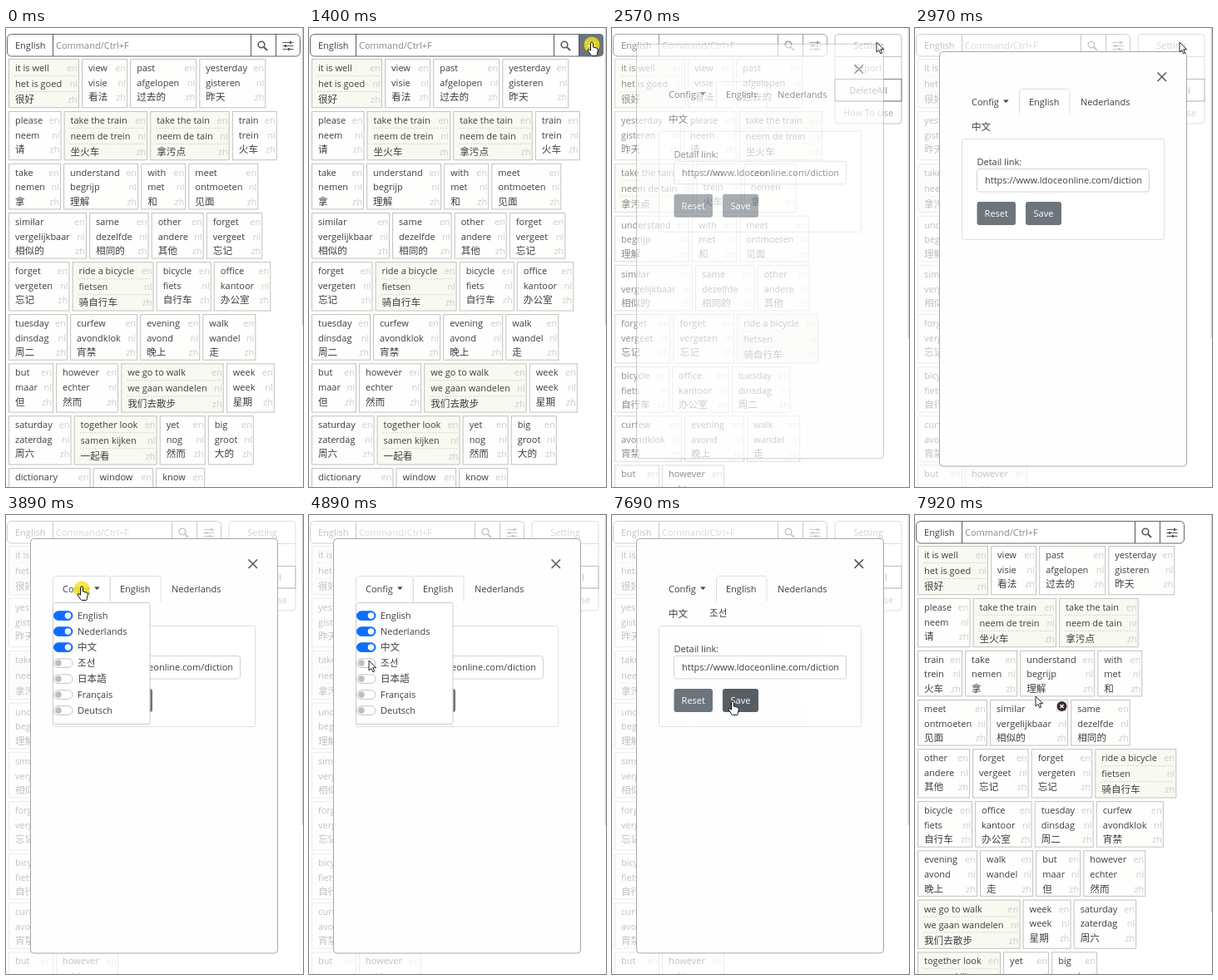
Write an HTML page that moves like this. It is 357x552 px and loops after 7990 ms.

```html
<!DOCTYPE html>
<html lang="en">
<head>
<meta charset="utf-8">
<title>Word cards</title>
<style>
html, body { margin: 0; width: 100%; height: 100%; overflow: hidden; background: #fff; }
svg { display: block; width: 357px; height: 552px; font: 11px "Open Sans", "Noto Sans CJK SC", "Noto Sans CJK KR", sans-serif; fill: #3c3f42; }
.cjk { font: 11.6px "Noto Sans CJK SC", "Noto Sans CJK", sans-serif; }
.ko { font: 11.6px "Noto Sans CJK KR", "Noto Sans CJK", sans-serif; }
.tag { fill: #cdcdcd; text-anchor: end; }
.mid { text-anchor: middle; }
.hint { fill: #85898d; }
.line { fill: none; stroke: #55595d; }
.dash { stroke: #d3d5cd; stroke-dasharray: 2 1.5; }
.soft { fill: #fff; stroke: #dcdfe2; }
</style>
</head>
<body>
<svg viewBox="0 0 357 552" xmlns="http://www.w3.org/2000/svg"></svg>
<script>
const LOOP = 7990;

// English | Dutch | Chinese | card width; "*" marks a phrase
const WORDS = `*it is well|het is goed|很好|85
view|visie|看法|55
past|afgelopen|过去的|80
yesterday|gisteren|昨天|80
please|neem|请|63.5
*take the train|neem de trein|坐火车|100.5
*take the tain|neem de tain|拿污点|95.5
train|trein|火车|54
take|nemen|拿|63
understand|begrijp|理解|90
with|met|和|54
meet|ontmoeten|见面|84
similar|vergelijkbaar|相似的|94
same|dezelfde|相同的|71.5
other|andere|其他|63
forget|vergeet|忘记|67.5
forget|vergeten|忘记|73.5
*ride a bicycle|fietsen|骑自行车|98
bicycle|fiets|自行车|66
office|kantoor|办公室|68.5
tuesday|dinsdag|周二|71
curfew|avondklok|宵禁|81
evening|avond|晚上|72
walk|wandel|走|64
but|maar|但|54
however|echter|然而|75
*we go to walk|we gaan wandelen|我们去散步|123.5
week|week|星期|58
saturday|zaterdag|周六|75.5
*together look|samen kijken|一起看|100
yet|nog|然而|55
big|groot|大的|55
dictionary|woordenboek|字典|98.5
window|raam|窗户|72.5
know|weten|知道|59`.split("\n").map(row => {
  const [en, nl, zh, w] = row.replace("*", "").split("|");
  return { text: [en, nl, zh], w: +w, phrase: row[0] === "*" };
});

const text = (x, y, s, cls = "", extra = "") => `<text x="${x}" y="${y}" class="${cls}" ${extra}>${s}</text>`;
const rect = (x, y, w, h, extra = "") => `<rect x="${x}" y="${y}" width="${w}" height="${h}" ${extra}/>`;
const path = (d, extra = 'class="line"') => `<path d="${d}" ${extra}/>`;

function layout(limit) {
  const rows = [];
  let row = null, x = 0;
  for (const word of WORDS) {
    if (!row || x + word.w > limit) {
      rows.push(row = { cards: [], phrase: false });
      x = 3;
    }
    row.cards.push({ ...word, x });
    row.phrase = row.phrase || word.phrase;
    x += word.w + 3.1;
  }
  return rows;
}

function card({ x, w, phrase, text: lines }, y, h) {
  const pitch = phrase ? 19 : 17.6;
  let out = rect(x + .5, y + .5, w - 1, h - 1, `fill="${phrase ? "#f8f9f0" : "#fefefc"}" stroke="#bfc2bd"`);
  lines.forEach((s, i) => {
    const base = y + 15 + i * pitch;
    out += text(x + 8, base, s, i === 2 ? "cjk" : "") + text(x + w - 2, base, ["en", "nl", "zh"][i], "tag");
    if (phrase && i < 2) out += path(`M${x + 7} ${base + 5.5}H${x + w - 3}`, 'class="dash"');
  });
  return out;
}

function cards(right) {
  let y = 37, out = "";
  for (const row of layout(right - 4)) {
    if (y > 552) break;
    const h = row.phrase ? 59.3 : 55.6;
    for (const c of row.cards) out += card(c, y, h);
    y += h + 3.6;
  }
  return out;
}

function searchBar(right) {
  const a = right - 60, b = right - 30, c = right - 15;
  return rect(1.5, 7.5, right - 2, 26.5, 'rx="5" fill="#fff" stroke="#63676b"') +
    path(`M56.5 7.5V34M${a + .5} 7.5V34`) +
    text(11, 25, "English") + text(60, 25, "Command/Ctrl+F", "hint") +
    `<g class="hot" opacity="0">${path(`M${b} 7H${right - 5}q5 0 5 5V29q0 5-5 5H${b}Z`, 'fill="#6c757d"')}</g>` +
    path(`M${b + .5} 7.5V34`) +
    `<circle cx="${a + 13}" cy="20" r="3.8" class="line" stroke-width="1.6"/>` +
    path(`M${a + 16} 23l4 4`, 'class="line" stroke-width="2"') +
    `<g class="sliders" stroke="#55595d">${path(`M${c - 6.5} 17.5h13m-13 4h13m-13 4h13`, 'stroke-width="1.2"')}` +
    path(`M${c + 3} 16v3m-6 1v3m4 1v3`, 'stroke-width="2"') + "</g>";
}

function panel(right, live) {
  const x = right + 9, mid = x + 40, red = live ? "#dc3545" : "#333";
  let out = rect(x, 7.5, 80, 107.5, 'rx="4" fill="#fff" stroke="#92989d"') +
    path(`M${x} 34.5h80m-80 53.5h80`, 'stroke="#92989d"') +
    rect(x, 61.5, 80, 26.5, `fill="none" stroke="${red}"`);
  if (live) out += rect(x - .5, 7, 81, 27.5, 'rx="4" fill="#6c757d"');
  ["Setting", "Export", "DeleteAll", "How To Use"].forEach((s, i) => {
    const fill = i === 2 ? red : i === 0 && live ? "#fff" : "#6c757d";
    out += text(mid, 25 + i * 27, s, "mid", `fill="${fill}"`);
  });
  return out;
}

const page = (id, right, extra = "") => `<g id="${id}">${searchBar(right)}${cards(right)}${extra}</g>`;

const button = (id, x, w, s) =>
  rect(x, 209, w, 28, `id="${id}" rx="3" fill="#6c757d"`) + text(x + w / 2, 227, s, "mid", 'fill="#fff"');

function toggle(i, s) {
  const y = 121 + i * 19, cls = ["", "", "cjk", "ko", "cjk", "", ""][i];
  return `<g class="switch">${rect(57.5, y - 5.2, 22.5, 10.6, 'rx="5.3"')}<circle cy="${y + .1}" r="3.8"/></g>` +
    text(86, y + 4, s, cls);
}

const modal = `<g id="modal">
  ${rect(29.5, 28.5, 297, 498.5, 'rx="4" fill="#fefefe" stroke="#a5a7a9"')}
  ${path("M291.5 53.5l10.5 10.5m0-10.5l-10.5 10.5", 'class="line" stroke-width="1.5"')}
  ${rect(56.5, 133.5, 243, 121, 'rx="2" class="soft"')}
  ${path("M56.5 104V76.5q0-3 3-3H122q3 0 3 3V104", 'id="focus" class="soft"')}
  ${path("M125.5 104V76.5q0-3 3-3H183q3 0 3 3V104", 'class="soft"')}
  ${text(68, 93, "Config")}${path("M106 86.5h6.6l-3.3 3.6z", 'fill="#3c3f42"')}
  ${text(137, 93, "English")}${text(199, 93, "Nederlands")}
  ${text(68, 123, "中文", "cjk")}${text(117, 122.5, "조선", "ko", 'id="korean"')}
  ${text(74.5, 165, "Detail link:")}
  ${rect(74.5, 169.5, 207, 27.5, 'rx="3" fill="#fff" stroke="#ced4da"')}
  <g clip-path="url(#field)">${text(84, 187, "https://www.ldoceonline.com/dictionary/")}</g>
  ${button("reset", 74.5, 46.5, "Reset")}${button("save", 133, 43, "Save")}
  <g id="menu">${rect(56.5, 105.5, 116.5, 146, 'rx="2" fill="#fff" stroke="#c9cbcd"')}
  ${["English", "Nederlands", "中文", "조선", "日本語", "Français", "Deutsch"].map((s, i) => toggle(i, s)).join("")}</g>
</g>`;

document.querySelector("svg").innerHTML = `
  <clipPath id="field">${rect(84, 170, 188, 27)}</clipPath>
  ${rect(0, 0, 357, 552, 'fill="#fff"')}
  ${page("wide", 354)}
  ${page("open", 262, panel(262, true))}
  ${page("under", 259, panel(259, false))}
  ${page("done", 324, `<g id="remove"><circle cx="176.5" cy="230" r="6" fill="#3a2b2e"/>
    ${path("M174.4 227.9l4.2 4.2m0-4.2l-4.2 4.2", 'stroke="#fff" stroke-width="1.4"')}</g>`)}
  ${rect(0, 544, 357, 8, 'id="strip" fill="#dadcde"')}
  ${rect(0, 0, 357, 552, 'id="veil" fill="#fff"')}
  ${rect(355.7, 0, 1.3, 357, 'id="bar" fill="#d2d3d4"')}
  ${modal}
  <circle id="glow" r="9.5" fill="#f4e414" opacity=".8"/>
  <g id="cursor" stroke="#111" stroke-linejoin="round" fill="#fff">
    ${path("M0 0V12L2.8 9.4 4.8 13.8 6.7 13 4.8 8.7H8.6Z", 'id="arrow" stroke-width=".9"')}
    ${path("M-1.5 1.5a1.5 1.5 0 0 1 3 0V6l4.3 1.2q1.7.5 1.5 2.3l-.8 4.8q-.2 2.2-1.2 2.2h-5q-1 0-1.8-1.3l-3.4-5.2q-.4-1.4 1-1.5l2.4 1.6z", 'id="hand"')}
  </g>`;

const $ = id => document.getElementById(id);
const show = (id, on) => { $(id).style.display = on ? "" : "none"; };
const between = (t, a, b) => t >= a && t < b;
const ramp = (t, a, b) => Math.min(1, Math.max(0, (t - a) / (b - a)));
const ease = p => p * p * (3 - 2 * p);

// start, end, x, y reached at the end
const MOVES = [
  [0, 0, 356, 24], [900, 1080, 340, 17], [1810, 2040, 321, 17], [2119, 2120, 318, 17],
  [2970, 3660, 91, 86], [4230, 4890, 72, 175], [5200, 5750, 92, 95],
  [6290, 7000, 145, 224], [7690, 7920, 145, 218]
];
const CLICKS = [[1310, 1470], [3810, 3970], [5040, 5200], [6130, 6210], [7460, 7610]];

function pointer(t) {
  let x = 0, y = 0;
  for (const [a, b, mx, my] of MOVES) {
    if (t < a) break;
    const p = b > a ? ease(ramp(t, a, b)) : 1;
    x += (mx - x) * p;
    y += (my - y) * p;
  }
  return [x, y];
}

const switches = [...document.querySelectorAll(".switch")];
function setSwitch(el, on) {
  const [track, knob] = el.children;
  track.setAttribute("fill", on ? "#0d6efd" : "#fff");
  track.setAttribute("stroke", on ? "#0d6efd" : "#bfc1c3");
  knob.setAttribute("cx", on ? 74.5 : 63);
  knob.setAttribute("fill", on ? "#fff" : "#bdbfc1");
}

function draw(t) {
  const fade = ramp(t, 2350, 2730) * (1 - ramp(t, 7690, 7920));
  show("wide", t < 1470);
  show("open", between(t, 1470, 2420));
  show("under", between(t, 2420, 7840));
  show("done", t >= 7840);
  show("remove", t >= 7920);
  show("strip", between(t, 1550, 1960));

  const hot = between(t, 1000, 1470);
  document.querySelector("#wide .hot").setAttribute("opacity", hot ? 1 : 0);
  document.querySelector("#wide .sliders").setAttribute("stroke", hot ? "#fff" : "#55595d");

  $("veil").setAttribute("opacity", fade * .68);
  $("bar").setAttribute("height", t >= 7840 ? 478 : t >= 2420 ? 373 : 357);
  show("modal", fade > 0);
  $("modal").setAttribute("opacity", fade);
  $("modal").setAttribute("transform", `translate(0 ${-22 * (1 - fade)})`);

  const [x, y] = pointer(t);
  const onTab = between(t, 2970, 7000) && x < 125 && y < 104;
  const onSave = between(t, 6360, 7760) && x > 133 && y > 209;
  show("focus", between(t, 3600, 6210));
  show("menu", between(t, 3890, 6210));
  show("korean", t >= 6210);
  $("save").setAttribute("fill", onSave ? "#565e64" : "#6c757d");
  switches.forEach((el, i) => setSwitch(el, i < 3 || i === 3 && t >= 5120));

  const hand = t < 2120 || onTab || onSave;
  show("cursor", t >= 930);
  show("hand", hand);
  show("arrow", !hand);
  $("cursor").setAttribute("transform", `translate(${x} ${y})`);
  show("glow", CLICKS.some(([a, b]) => between(t, a, b)));
  $("glow").setAttribute("cx", x);
  $("glow").setAttribute("cy", y + 3);
}

const start = performance.now();
function tick() {
  draw((performance.now() - start) % LOOP);
  requestAnimationFrame(tick);
}
tick();
</script>
</body>
</html>
```
